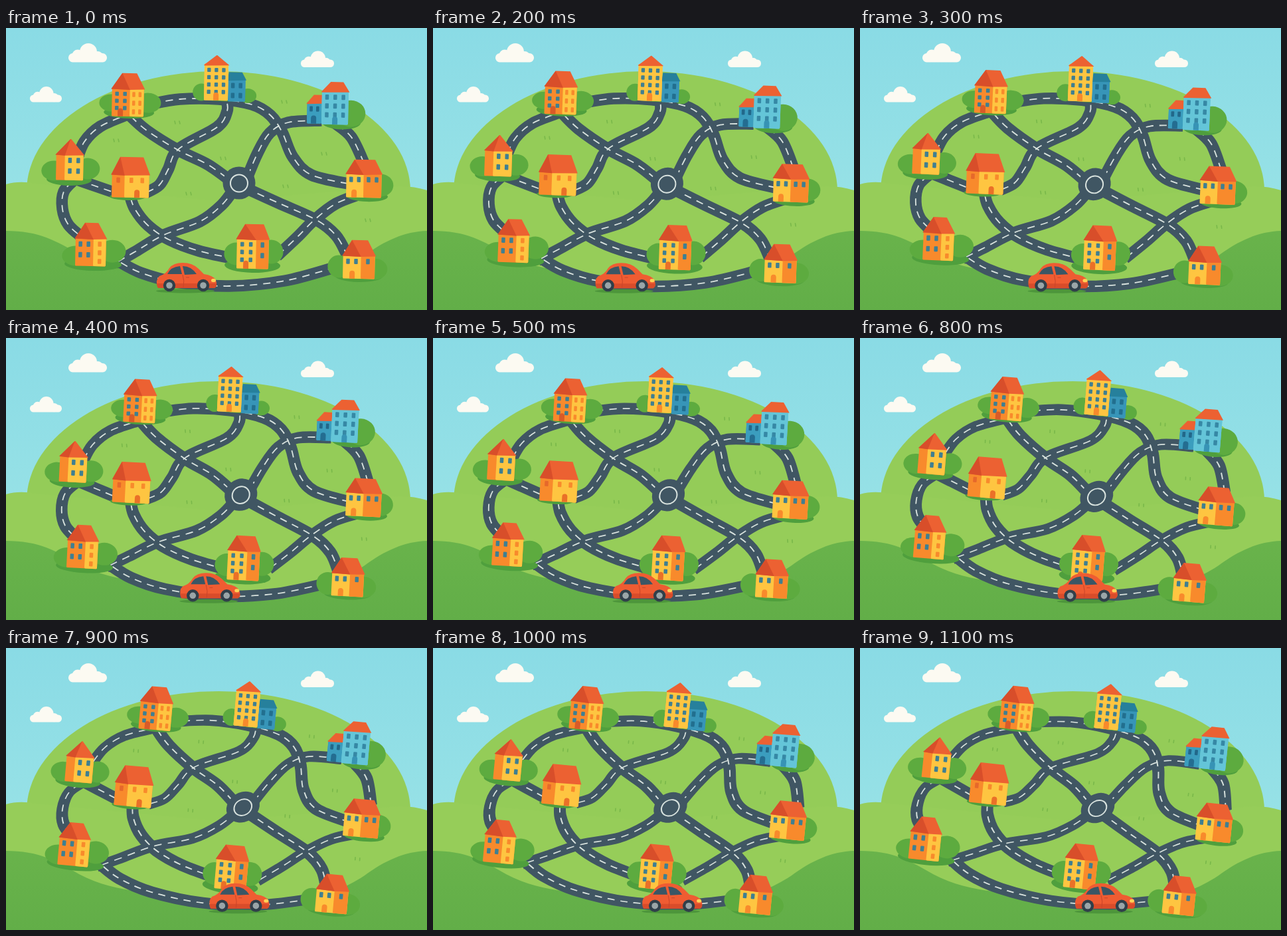
These frames come from a looping animation (634x424 px, 1.2 s). An HTML page with a canvas:

```html
<!DOCTYPE html>
<html lang="en">
<head>
<meta charset="utf-8">
<title>Turning town</title>
<style>
html, body { margin: 0; width: 634px; height: 424px; overflow: hidden; background: #8cdde5; }
canvas { display: block; }
</style>
</head>
<body>
<canvas id="stage" width="634" height="424"></canvas>
<script>
const ctx = document.getElementById('stage').getContext('2d');
const LOOP = 1200, STEP = 100, LAST = 11;
const ORANGE = '#f88a2c', YELLOW = '#fec541', TEAL = '#3f7f91', DOOR = '#ea7028';
const ROOF = '#ec6132', ROOF_DARK = '#d84e2a', BUSH = '#5dab3f', SHADE = '#4f9f3d';
const ROAD = '#405663', LINE = '#d9e3df';

const roads = [
  [[106,200], [118,171], [142,148], [183,130]],
  [[215,115], [262,107], [320,107], [370,115], [398,131], [416,157], [432,194], [460,221], [520,235]],
  [[332,108], [333,125], [318,149], [260,182], [244,213], [231,236], [210,248]],
  [[184,129], [212,154], [260,184], [305,206], [345,235]],
  [[362,228], [378,190], [397,158], [425,142], [475,139]],
  [[494,142], [520,164], [540,205]],
  [[104,227], [87,246], [85,272], [94,296], [115,315]],
  [[104,227], [130,236], [168,249]],
  [[186,250], [194,272], [214,297], [245,318], [290,335], [345,347]],
  [[164,354], [195,336], [238,311], [292,291], [325,266], [345,240]],
  [[355,238], [410,263], [468,289], [497,312], [513,340]],
  [[535,249], [497,264], [465,288], [438,315], [408,343]],
  [[168,350], [203,368], [256,382], [336,388], [420,380], [495,360]]
];

const tufts = [[166,169], [258,142], [327,196], [419,111], [479,189], [421,238], [275,249], [545,289]];

// base: ground point; x: left, split, right; y: ridge, eave, foot; ridge: ends of the roof top
// wins: per face [columns, rows, colour]; bushes: [x, y, rx, ry]; door: [x, colour]
const houses = [
  { base: [183,133], x: [159,186,207], y: [68,92,133], ridge: [174,196], walls: [ORANGE, YELLOW],
    wins: [[2,3,TEAL], [2,3,ORANGE]], door: [172,'#d95b28'],
    bushes: [[158,113,18,13], [214,112,19,15], [185,127,38,9]] },
  { base: [320,109], x: [298,298,334], y: [41,56,109], ridge: [316,317], walls: [YELLOW, YELLOW],
    wins: [null, [3,4,TEAL]], door: [316,ORANGE],
    annex: { x: [334,334,360], y: [66,78,110], ridge: [335,355], walls: ['#3795b8', '#3795b8'],
      roofs: ['#26809c', '#26809c'], wins: [null, [2,2,'#226f8f']] },
    bushes: [[294,97,13,13], [364,101,13,11], [330,104,46,6]] },
  { base: [485,145], x: [475,475,515], y: [81,96,145], ridge: [488,507], walls: ['#64c5d8', '#64c5d8'],
    wins: [null, [3,3,'#3688a5']], door: [495,'#3793b5'],
    annex: { x: [453,453,475], y: [101,114,144], ridge: [463,475], walls: ['#3b9dbe', '#3b9dbe'],
      wins: [null, [2,1,'#22688a']], door: [463,'#246d91'] },
    bushes: [[519,128,22,20], [505,142,29,10]] },
  { base: [96,229], x: [75,88,116], y: [167,191,229], ridge: [96,97], walls: [ORANGE, YELLOW],
    wins: [null, [2,2,TEAL]],
    bushes: [[72,215,19,15], [123,211,18,16], [95,228,34,9]] },
  { base: [187,255], x: [159,178,215], y: [194,221,255], ridge: [171,206], walls: [ORANGE, YELLOW],
    wins: [[1,1,'#e6682b'], [2,1,ORANGE]], door: [197,DOOR],
    bushes: [[183,254,27,5]] },
  { base: [538,255], x: [512,538,565], y: [198,220,255], ridge: [524,555], walls: [YELLOW, ORANGE],
    wins: [[2,1,TEAL], [2,1,TEAL]], door: [524,ORANGE],
    bushes: [[564,236,19,17], [544,253,31,8]] },
  { base: [127,358], x: [104,131,150], y: [293,317,358], ridge: [118,138], walls: [ORANGE, YELLOW],
    wins: [[2,2,TEAL], [1,3,ORANGE]],
    bushes: [[105,343,21,15], [160,335,20,17], [131,355,43,10]] },
  { base: [371,362], x: [347,376,395], y: [295,318,362], ridge: [359,387], walls: [YELLOW, ORANGE],
    wins: [[2,3,TEAL], [1,2,TEAL]], door: [361,DOOR],
    bushes: [[346,340,18,17], [399,336,18,18], [371,357,42,11]] },
  { base: [531,377], x: [507,534,555], y: [319,343,377], ridge: [520,544], walls: [YELLOW, ORANGE],
    wins: [[2,1,TEAL], [1,1,TEAL]], door: [521,ORANGE],
    bushes: [[501,359,17,17], [555,362,19,16], [531,373,36,9]] }
];

function fill(color, path) { ctx.fillStyle = color; ctx.fill(path); }
function svg(color, d) { fill(color, new Path2D(d)); }
function poly(color, ...pts) { svg(color, 'M' + pts.join('L') + 'Z'); }

function oval(color, x, y, rx, ry = rx) {
  ctx.fillStyle = color;
  ctx.beginPath();
  ctx.ellipse(x, y, rx, ry, 0, 0, Math.PI * 2);
  ctx.fill();
}

function box(color, x, y, w, h, r = 1) {
  ctx.fillStyle = color;
  ctx.beginPath();
  ctx.roundRect(x, y, w, h, r);
  ctx.fill();
}

function blend(y0, y1, a, b) {
  const g = ctx.createLinearGradient(0, y0, 0, y1);
  g.addColorStop(0, a);
  g.addColorStop(1, b);
  return g;
}

// Smooth curve through the given points
function curve(pts) {
  const p = new Path2D();
  const at = i => pts[Math.max(0, Math.min(pts.length - 1, i))];
  p.moveTo(...pts[0]);
  for (let i = 0; i < pts.length - 1; i++) {
    const [a, b, c, d] = [at(i - 1), at(i), at(i + 1), at(i + 2)];
    p.bezierCurveTo(b[0] + (c[0] - a[0]) / 6, b[1] + (c[1] - a[1]) / 6,
      c[0] - (d[0] - b[0]) / 6, c[1] - (d[1] - b[1]) / 6, c[0], c[1]);
  }
  return p;
}
const lanes = roads.map(curve);

// Ground seen at a slant, turning about the middle of the hill
function turn(s) {
  const a = 1 - 0.035 * s * s, b = 0.16 * s, c = -0.372 * s, d = 1 - 0.087 * s * s;
  return new DOMMatrix([a, b, c, d, 320 + 5.5 * s - a * 320 - c * 240, 240 + 2 * s - b * 320 - d * 240]);
}

function cloud(x, y, w) {
  ctx.save();
  ctx.translate(x, y);
  ctx.scale(w / 58, w / 58);
  const white = '#fcfaf2';
  box(white, 0, 15, 58, 13.5, 6.5);
  oval(white, 30, 13, 13);
  oval(white, 14, 18, 8.5);
  oval(white, 44, 20, 8);
  ctx.restore();
}

function scenery() {
  ctx.fillStyle = blend(0, 240, '#8adbe5', '#96e1e6');
  ctx.fillRect(0, 0, 634, 424);
  cloud(94, 23, 58);
  cloud(36, 88, 48);
  cloud(444, 34.5, 50);
  oval('#94cc58', 320, 245, 289, 180);
  svg('#96cd59', 'M0 235Q20 229 45 234L320 260L590 238Q612 237 634 244V424H0Z');
  svg(blend(305, 424, '#69b34b', '#62ae48'),
    'M0 305C50 305 75 320 110 340C140 356 170 362 200 366Q320 388 440 378C480 373 510 362 540 342C570 320 600 306 634 305V424H0Z');
}

function ground(m) {
  ctx.save();
  ctx.transform(m.a, m.b, m.c, m.d, m.e, m.f);
  ctx.lineCap = 'round';
  ctx.strokeStyle = '#79b84a';
  ctx.lineWidth = 1.6;
  for (const [x, y] of tufts) ctx.stroke(new Path2D(`M${x - 4} ${y - 2}l1 4M${x + 3} ${y - 2}l1 4`));
  ctx.lineCap = 'butt';
  ctx.strokeStyle = ROAD;
  ctx.lineWidth = 17.5;
  ctx.lineJoin = 'round';
  lanes.forEach(p => ctx.stroke(p));
  ctx.strokeStyle = LINE;
  ctx.lineWidth = 1.8;
  ctx.setLineDash([11, 9]);
  ctx.lineDashOffset = -6;
  lanes.forEach(p => ctx.stroke(p));
  ctx.setLineDash([]);
  oval(ROAD, 351, 233, 24.5);
  ctx.lineWidth = 2;
  ctx.beginPath();
  ctx.arc(351, 233.5, 13, 0, Math.PI * 2);
  ctx.stroke();
  ctx.restore();
}

function windows(x0, x1, top, foot, spec, hasDoor) {
  if (!spec) return;
  const [cols, rows, color] = spec;
  const dx = (x1 - x0) / (cols + 0.25);
  const dy = Math.min(16, (foot - top - (hasDoor ? 9 : 2)) / rows);
  const w = Math.min(5.5, dx * 0.48), h = Math.min(8, dy * 0.58);
  for (let r = 0; r < rows; r++) {
    for (let c = 0; c < cols; c++) {
      const x = (x0 + x1) / 2 + (c - (cols - 1) / 2) * dx - w / 2;
      box(color, x, top + 4 + r * dy, w, h);
    }
  }
}

function building(b) {
  const [l, mid, r] = b.x, [top, eave, foot] = b.y, [r0, r1] = b.ridge;
  const [dark, light] = b.roofs || [ROOF_DARK, ROOF];
  box(b.walls[0], l, eave - 2, r - l, foot - eave + 2, 1.5);
  box(b.walls[1], mid, eave - 2, r - mid, foot - eave + 2, 1.5);
  const inLeft = b.door && b.door[0] < mid;
  windows(l, mid, eave, foot, b.wins[0], inLeft);
  windows(mid, r, eave, foot, b.wins[1], b.door && !inLeft);
  if (b.door) box(b.door[1], b.door[0] - 4, foot - 12, 8, 12, [4, 4, 0, 0]);
  poly(light, [r0, top], [r1, top], [r + 1.5, eave], [mid, eave + 1], [l - 1, eave]);
  if (mid > l) poly(dark, [r0, top], [mid, eave + 1], [l - 1.5, eave]);
}

function house(h, m, s) {
  const [x, y] = h.base;
  const p = m.transformPoint(new DOMPoint(x, y));
  ctx.save();
  ctx.translate(p.x, p.y);
  ctx.rotate(0.02 + 0.085 * s);
  ctx.translate(-x, -y);
  const n = h.bushes.length - 1;
  oval(SHADE, ...h.bushes[n]);
  h.bushes.slice(0, n).forEach(b => oval(BUSH, ...b));
  if (h.annex) building(h.annex);
  building(h);
  ctx.restore();
}

function car(s) {
  ctx.save();
  ctx.translate(97 * s, s * 0.8);
  oval('#4d963b', 270, 395.5, 44, 3);
  svg('#ef5c32', 'M229 391Q224 379 231 373Q241 370 246 361Q252 353 266 353Q281 353 290 362L298 370Q312 372 316 379Q319 388 314 391Z');
  svg('#d94c2a', 'M227 384H317Q318 389 314 391H229Q227 388 227 384Z');
  svg('#3a5665', 'M243 370Q248 359 262 358L265 370ZM266 358Q279 358 287 370L269 371Z');
  ctx.strokeStyle = '#c9452a';
  ctx.lineWidth = 1;
  ctx.stroke(new Path2D('M266 371Q269 380 267 390M271 375h5'));
  box('#ffd257', 309, 377, 7, 5, 2.5);
  for (const x of [246, 297]) {
    oval('#303f4a', x, 387, 9.2);
    oval('#9aa5a8', x, 387, 4.8);
  }
  ctx.restore();
}

const start = performance.now();
function draw() {
  const t = (performance.now() - start) % LOOP;
  const s = Math.floor(t / STEP) / LAST;
  const m = turn(s);
  scenery();
  ground(m);
  houses.forEach(h => house(h, m, s));
  car(s);
  requestAnimationFrame(draw);
}
draw();
</script>
</body>
</html>
```
